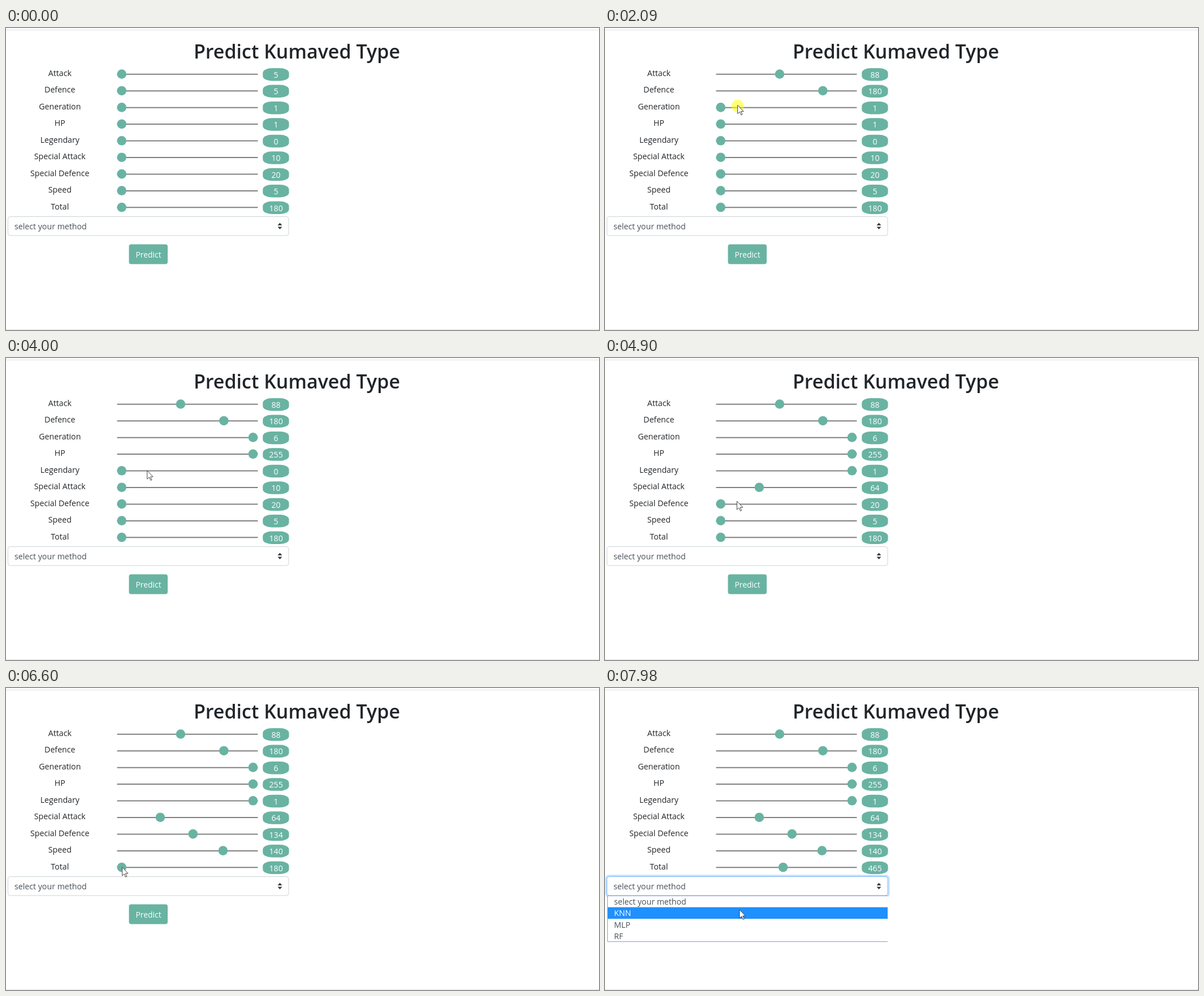
Recreate the animation shown at these times as an HTML page. Size 1049 px wide and 534 px high, loop 8000 ms.

```html
<!DOCTYPE html>
<html lang="en">
<head>
<meta charset="utf-8">
<title>Predict Type</title>
<style>
html, body { margin: 0; width: 100%; height: 100%; overflow: hidden; background: #fff; }
svg { display: block; width: 100%; height: 100%; font: 14.2px "Open Sans", "Noto Sans", sans-serif; fill: #212529; }
.mid { text-anchor: middle; }
.title { font-size: 34px; font-weight: 600; }
.green { fill: #69b3a2; }
.white { fill: #fff; }
.gray { fill: #495057; }
.edge { stroke: #dee2e6; }
.track { stroke: #808080; stroke-width: 2; }
</style>
</head>
<body>
<svg id="stage" viewBox="0 0 1049 534">
  <path class="edge" d="M0 3.5H1049M0 533.5H1049"/>
  <text class="mid title" x="514.5" y="53.5">Predict Kumaved Type</text>
  <g id="rows"></g>
  <rect id="ring" x="2" y="332" width="500" height="37" rx="5" fill="none" stroke="#007bff" stroke-opacity=".25" stroke-width="3"/>
  <rect id="select" x="3.5" y="333.5" width="496.5" height="33.5" rx="4" fill="#fff" stroke="#ced4da"/>
  <text class="gray" x="15" y="356">select your method</text>
  <path fill="#343a40" d="M480.5 349l4-4.5l4 4.5zm0 2.5l4 4.5l4-4.5z"/>
  <rect class="green" x="217.5" y="382.5" width="68.5" height="35" rx="4"/>
  <text class="mid white" x="252" y="406" font-size="13.9">Predict</text>
  <g id="menu">
    <rect class="white" x="4" y="367.5" width="496" height="82"/>
    <rect id="hover" x="5" width="495" height="20.5" fill="#1e90ff"/>
    <path d="M500 367.5H4.5V448.5H500" fill="none" stroke="#7f9fdc"/>
  </g>
  <g id="cursor">
    <circle id="glow" cy="1.5" r="11" fill="#ff0" fill-opacity=".55"/>
    <path d="M0 0V15L3.6 11.8L6.2 17.4L8.3 16.4L5.8 11H10.4Z" fill="#fff" stroke="#333" stroke-width=".9"/>
  </g>
</svg>
<script>
const LOOP = 8000, LEFT = 204.7, SPAN = 232.3;
const THUMB_LAG = 14, TEXT_LAG = 20;
const OPEN_AT = 7800, ROW = 20.4;

// label, min, max, pointer arrives, drag ends, release, start y, end x, end y
const sliders = [
  ["Attack", 5, 190, 480, 890, 950, 83, 308.9, 63],
  ["Defence", 5, 230, 1285, 1600, 1640, 108, 385.4, 114],
  ["Generation", 1, 6, 1995, 2290, 2480, 135, 445, 147],
  ["HP", 1, 255, 2780, 3260, 3300, 167, 465, 175],
  ["Legendary", 0, 1, 4070, 4380, 4420, 200, 440, 203],
  ["Special Attack", 10, 194, 4600, 4770, 4790, 231, 272.9, 238],
  ["Special Defence", 20, 230, 4990, 5340, 5360, 264, 330.8, 263],
  ["Speed", 5, 180, 5660, 6000, 6030, 290, 383.9, 271],
  ["Total", 180, 780, 6620, 7215, 7225, 317, 315, 313]
].map(([label, min, max, at, end, to, y, endX, endY]) =>
  ({ label, min, max, at, end, to, y, endX, endY, from: at + 10 }));

// pointer stops (time, x, y): one drag per slider plus the free moves
const stops = sliders.flatMap(s => [
  [s.at, 205, s.y], [s.at + 40, 205, s.y],
  [s.end, s.endX, s.endY], [s.to, s.endX, s.endY]
]).concat([
  [100, 885, 520],
  [3670, 428, 195], [3830, 428, 195],
  [7000, 318, 313], [7130, 318, 313], [7370, 315, 313],
  [7740, 238, 350], [7830, 238, 350], [7970, 238, 392]
]).sort((a, b) => a[0] - b[0]);

const $ = id => document.getElementById(id);
const clamp = (v, lo, hi) => Math.min(hi, Math.max(lo, v));

function add(parent, tag, attrs, text = "") {
  const el = document.createElementNS("http://www.w3.org/2000/svg", tag);
  for (const k in attrs) el.setAttribute(k, attrs[k]);
  el.textContent = text;
  return parent.appendChild(el);
}

function pointer(t) {
  const i = stops.findIndex(p => p[0] > t);
  if (i < 0) return stops[stops.length - 1].slice(1);
  if (i === 0) return stops[0].slice(1);
  const [t0, x0, y0] = stops[i - 1], [t1, x1, y1] = stops[i];
  const u = (t - t0) / (t1 - t0), s = u * u * (3 - 2 * u);
  return [x0 + (x1 - x0) * s, y0 + (y1 - y0) * s];
}

function valueAt(s, t) {
  if (t < s.from) return s.min;
  const [x] = pointer(Math.min(t, s.to));
  return Math.round(s.min + (s.max - s.min) * clamp((x - LEFT) / SPAN, 0, 1));
}

sliders.forEach((s, i) => {
  const g = add($("rows"), "g", { transform: `translate(0 ${81.5 + 29.44 * i})` });
  add(g, "text", { class: "mid", x: 95.3, y: 3.5 }, s.label);
  add(g, "path", { class: "track", d: "M196.5 .3H445.5" });
  s.thumb = add(g, "circle", { class: "green", r: 8.3 });
  add(g, "rect", { class: "green", x: 454.3, y: -10.5, width: 46.3, height: 22.5, rx: 16, ry: 8.5 });
  s.text = add(g, "text", { class: "mid white", x: 477.6, y: 6.5 });
});

const options = ["select your method", "KNN", "MLP", "RF"].map((name, i) =>
  add($("menu"), "text", { x: 16, y: 383 + ROW * i }, name));

function show(el, on) {
  el.setAttribute("visibility", on ? "inherit" : "hidden");
}

function draw(now) {
  const t = now % LOOP;
  for (const s of sliders) {
    const f = (valueAt(s, t - THUMB_LAG) - s.min) / (s.max - s.min);
    s.thumb.setAttribute("cx", LEFT + SPAN * f);
    s.text.textContent = valueAt(s, t - TEXT_LAG);
  }

  const [x, y] = pointer(t), open = t >= OPEN_AT;
  const picked = y >= 387 ? 1 : 0;
  const clicking = Math.abs(t - OPEN_AT) < 40;
  show($("cursor"), t >= 100);
  $("cursor").setAttribute("transform", `translate(${x} ${y})`);
  show($("glow"), clicking || sliders.some(s => t >= s.from && t < s.to));

  show($("menu"), open);
  show($("ring"), open);
  $("select").setAttribute("stroke", open ? "#80bdff" : "#ced4da");
  $("hover").setAttribute("y", 367.2 + ROW * picked);
  options.forEach((o, i) => o.setAttribute("class", i === picked ? "white" : "gray"));
}

const start = performance.now();
function tick() {
  draw(performance.now() - start);
  requestAnimationFrame(tick);
}
tick();
</script>
</body>
</html>
```
